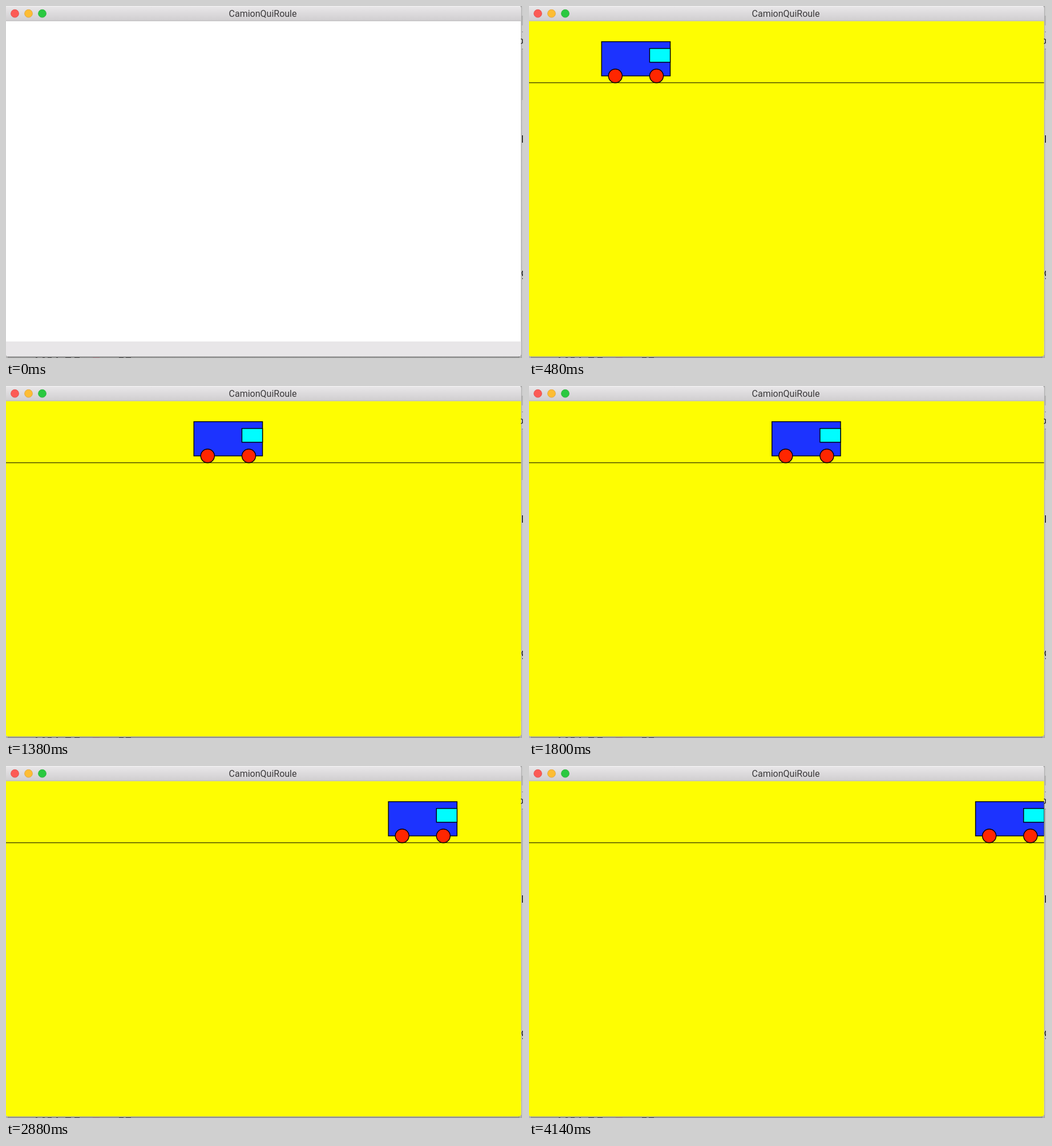
Write an HTML page that moves like this. It is 906x618 px and loops after 4.44 s.

```html
<!DOCTYPE html>
<html lang="fr">
<head>
<meta charset="utf-8">
<title>Animation</title>
<style>
  html, body { margin: 0; width: 100%; height: 100%; overflow: hidden; }
  svg { display: block; width: 906px; height: 618px; }
  text { font: 16px Roboto, sans-serif; fill: #3b393b; }
  .ink { stroke: #000; stroke-width: 1.15; }
</style>
</head>
<body>
<svg viewBox="0 0 906 618">
  <defs>
    <linearGradient id="bar" x2="0" y2="1">
      <stop stop-color="#e9e7e9"/><stop offset="1" stop-color="#d0ced0"/>
    </linearGradient>
    <linearGradient id="side">
      <stop stop-color="#929292"/><stop offset=".5" stop-color="#bdbdbd"/><stop offset="1" stop-color="#dadada"/>
    </linearGradient>
    <linearGradient id="under" x2="0" y2="1">
      <stop stop-color="#6c6c6c"/><stop offset="1" stop-color="#a4a4a4"/>
    </linearGradient>
    <clipPath id="window"><path d="M0 0H899Q902.5 0 902.5 4V611Q902.5 615.2 898 615.2H4Q0 615.2 0 611Z"/></clipPath>
  </defs>

  <!-- desktop showing around the window -->
  <rect width="906" height="618" fill="#b4b4b4"/>
  <rect x="902" width="4" height="618" fill="url(#side)"/>
  <path d="M903 17h3v17h-3zM903 75h3v90h-3z" fill="#999" opacity=".4"/>
  <path d="M904 45.5h2M904 75.5h2" stroke="#8a8a8a"/>
  <rect x="3" y="615" width="897" height="3" fill="url(#under)"/>
  <path d="M52 617.5h3m9 0h4m5 0h7m8 0h3m13 0h10m6 0h9m69 0h8m4 0h9" stroke="#444"/>
  <path d="M152 617.5h12" stroke="#a87f85"/>
  <path d="M905.2 227v13M906 465q-2 2-1.5 5t1.5 4m0 4l-1 1" fill="none" stroke="#222" stroke-width="1.6"/>

  <g clip-path="url(#window)">
    <rect width="903" height="616" fill="#fff"/>
    <rect y="589" width="903" height="27" fill="#e8e6e8"/>
    <!-- drawing area: 750 units wide, below a bar of 22 units -->
    <g id="scene" transform="translate(0 26.47) scale(1.2033)">
      <rect width="751" height="490" fill="#fefd02"/>
      <path d="M0 90H751" stroke="#000"/>
      <g id="van" class="ink">
        <rect y="30" width="100" height="50" fill="#1c33ff"/>
        <rect x="70" y="40" width="30" height="20" fill="#00fdff"/>
        <circle cx="20" cy="80" r="10" fill="#ff2600"/>
        <circle cx="80" cy="80" r="10" fill="#ff2600"/>
      </g>
    </g>
    <rect width="903" height="26" fill="url(#bar)"/>
    <path d="M0 .5H903" stroke="#f3f2f3"/>
    <path d="M0 26H903" stroke="#b3b1b3"/>
    <g stroke-width=".8">
      <circle cx="15.5" cy="13.2" r="6.9" fill="#fc5b55" stroke="#df4744"/>
      <circle cx="39.5" cy="13.2" r="6.9" fill="#fdbd34" stroke="#dea035"/>
      <circle cx="63.5" cy="13.2" r="6.9" fill="#2ac941" stroke="#25ab35"/>
    </g>
    <text x="450" y="19" text-anchor="middle">CamionQuiRoule</text>
  </g>
  <path d="M902.5 58q3-.5 3 3.7t-3 4" fill="none" stroke="#222" stroke-width="1.4"/>
</svg>
<script>
const LOOP = 4440, STEP = 60, STOP = 782.5, SCALE = 1.2033;
const scene = document.getElementById('scene');
const van = document.getElementById('van');

// time in ms and left edge of the van in pixels
const path = [
  [0, 18.3], [540, 140.8], [960, 232.7], [1080, 260.3], [1800, 425.7],
  [2340, 547.8], [2880, 670.1], [3240, 752.2], [3420, 793]
];

function place(t) {
  const i = path.findIndex(p => p[0] > t);
  if (i < 0) return STOP;
  const [t0, x0] = path[i - 1], [t1, x1] = path[i];
  return Math.min(STOP, x0 + (x1 - x0) * (t - t0) / (t1 - t0));
}

const start = performance.now();
function draw() {
  const t = Math.floor((performance.now() - start) % LOOP / STEP) * STEP;
  scene.style.display = t ? '' : 'none';
  van.setAttribute('transform', `translate(${place(t) / SCALE})`);
  requestAnimationFrame(draw);
}
draw();
</script>
</body>
</html>
```
